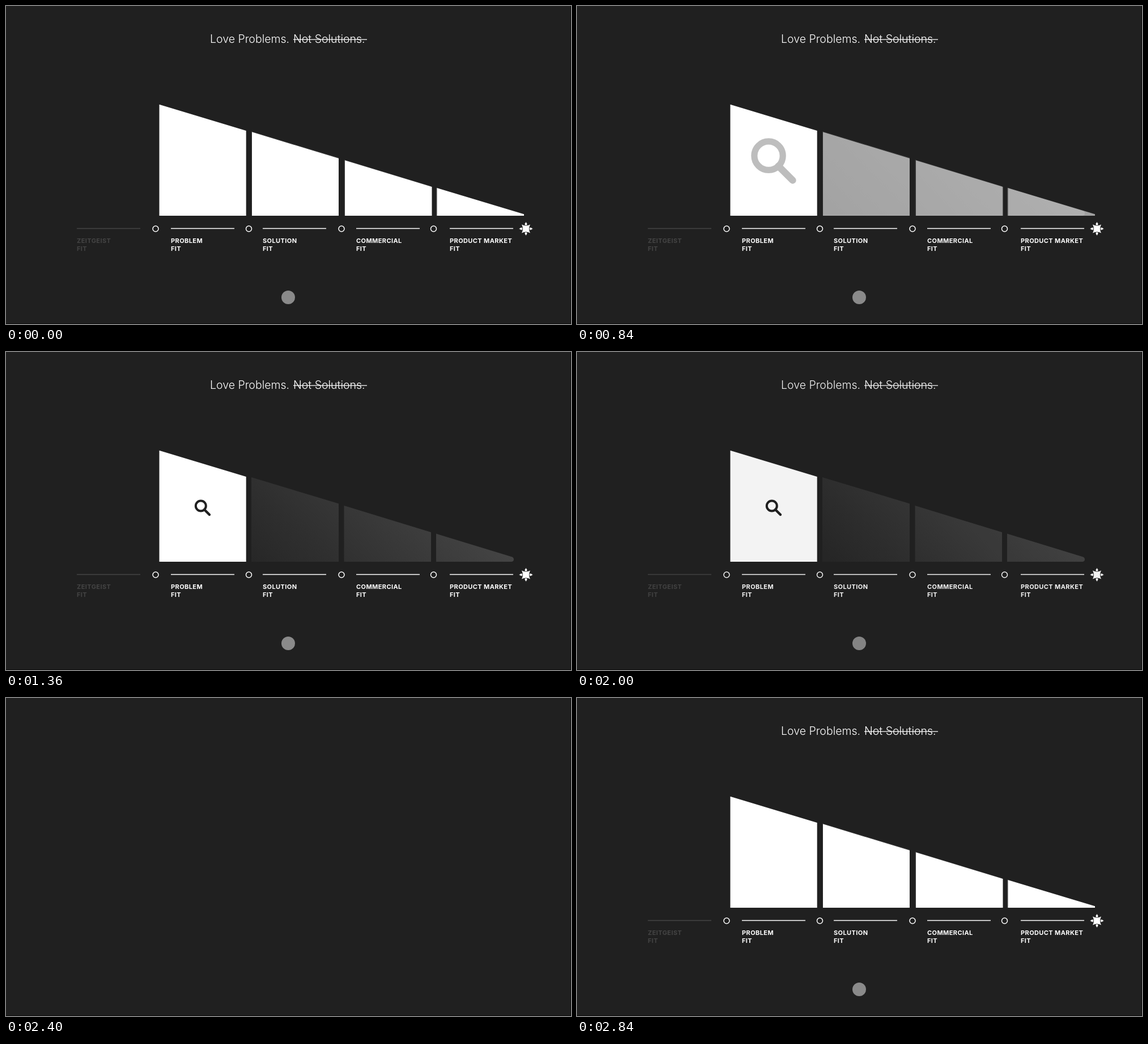
Write an HTML page that moves like this. It is 997 px wide and 561 px high and loops after 2880 ms.

```html
<!DOCTYPE html>
<html lang="en">
<head>
<meta charset="utf-8">
<title>Love Problems</title>
<style>
  html, body { margin: 0; width: 100%; height: 100%; overflow: hidden; background: #202020; }
  svg { display: block; width: 997px; height: 561px; }
  text { font-family: Inter, "Open Sans", sans-serif; fill: #fff; }
  .title { font-size: 19.5px; font-weight: 350; }
  .label { font-size: 11px; font-weight: 700; letter-spacing: .4px; }
  .axis { fill: none; stroke: #fff; stroke-width: 1.5; }
  .off { fill: #444; stroke: #444; }
  text.off { stroke: none; }
</style>
</head>
<body>
<svg viewBox="0 0 997 561">
  <defs>
    <linearGradient id="shade" gradientUnits="userSpaceOnUse" x1="433" y1="370" x2="667" y2="136">
      <stop offset="0" stop-color="#272727"/>
      <stop offset=".3" stop-color="#2f2f2f"/>
      <stop offset="1" stop-color="#444"/>
    </linearGradient>
    <clipPath id="above"><rect width="997" height="370"/></clipPath>
  </defs>
  <rect width="997" height="561" fill="#202020"/>
  <g id="scene">
    <text class="title" x="360" y="65">Love Problems.</text>
    <text class="title" x="507" y="65">Not Solutions.</text>
    <path d="M507 59.2H637" stroke="#fff" stroke-width="1.3"/>

    <g fill="url(#shade)">
      <path d="M433 221L587 267.5V370H433Z"/>
      <path d="M596.5 271L750 318V370H596.5Z"/>
      <path d="M759 320.5L893 361.5Q896 362.5 896 366T892 370H759Z"/>
    </g>
    <path d="M270.5 173.8L423.7 220V370H270.5Z" fill="#fff"/>
    <g id="bright" fill="#fff">
      <path d="M434 222.3L587 268.8V370H434Z"/>
      <path d="M598 272.2L751.5 319V370H598Z"/>
      <path d="M760.5 321L914 367.3V370H760.5Z"/>
    </g>
    <g clip-path="url(#above)">
      <g id="lens" fill="none" stroke="#202020">
        <circle cx="-3.2" cy="-3.5" r="9" stroke-width="4"/>
        <path d="M3 3L12 12" stroke-width="4.4" stroke-linecap="round"/>
      </g>
    </g>

    <g id="axis"></g>
    <g transform="translate(917.5 393)" fill="#fff">
      <path d="M-7.5 -7.5Q0 -3.5 7.5 -7.5Q3.5 0 7.5 7.5Q0 3.5 -7.5 7.5Q-3.5 0 -7.5 -7.5Z"/>
      <path id="ray" d="M0 -12.3Q2.6 -9 2.4 -7.2L0 -5.6L-2.4 -7.2Q-2.6 -9 0 -12.3Z"
        stroke="#202020" stroke-width=".6"/>
      <use href="#ray" transform="rotate(90)"/>
      <use href="#ray" transform="rotate(180)"/>
      <use href="#ray" transform="rotate(270)"/>
    </g>
    <circle cx="498" cy="514" r="12" fill="#8a8a8a"/>
  </g>
  <path d="M0 560.5H997M996.5 0V561" stroke="#0c0c0c"/>
</svg>
<script>
const LOOP = 2880, STEP = 40;
const el = id => document.getElementById(id);
const scene = el("scene"), bright = el("bright"), lens = el("lens");
const ramp = (t, from, to) => Math.min(1, Math.max(0, (t - from) / (to - from)));

const stages = [
  [125, "ZEITGEIST"], [291, "PROBLEM"], [453, "SOLUTION"],
  [618, "COMMERCIAL"], [783, "PRODUCT MARKET"]
];
el("axis").innerHTML = stages.map(([x, name], i) => {
  const off = i ? "" : " off";
  return `<path class="axis${off}" d="M${x} 392.5h112"/>
    <text class="label${off}" x="${x}" y="417.6">${name}</text>
    <text class="label${off}" x="${x}" y="432.4">FIT</text>`;
}).join("") + [264, 428.5, 592, 754.5].map(x =>
  `<circle class="axis" cx="${x}" cy="393" r="5"/>`).join("");

function draw(time) {
  const t = Math.floor(time % LOOP / STEP) * STEP;
  const entering = t >= 2400;

  // whole scene fades out, then back in at its first state
  const fade = entering
    ? Math.sin(ramp(t, 2420, 2840) * Math.PI / 2)
    : 1 - ramp(t, 1980, 2400);
  scene.setAttribute("opacity", fade);

  bright.setAttribute("opacity", entering ? 1 : 1 - ramp(t, 600, 1120) ** 1.1);

  // magnifier drops in from a large size
  const scale = 1 + 8.2 * (1 - ramp(t, 600, 1360)) ** 4;
  const y = 275 - .6 * (scale - 1);
  lens.setAttribute("transform", `translate(347 ${y}) scale(${scale})`);
  lens.setAttribute("opacity", entering ? 0 : ramp(t, 590, 1160) ** 1.5);
}

const start = performance.now();
function tick() {
  draw(performance.now() - start);
  requestAnimationFrame(tick);
}
tick();
</script>
</body>
</html>
```
